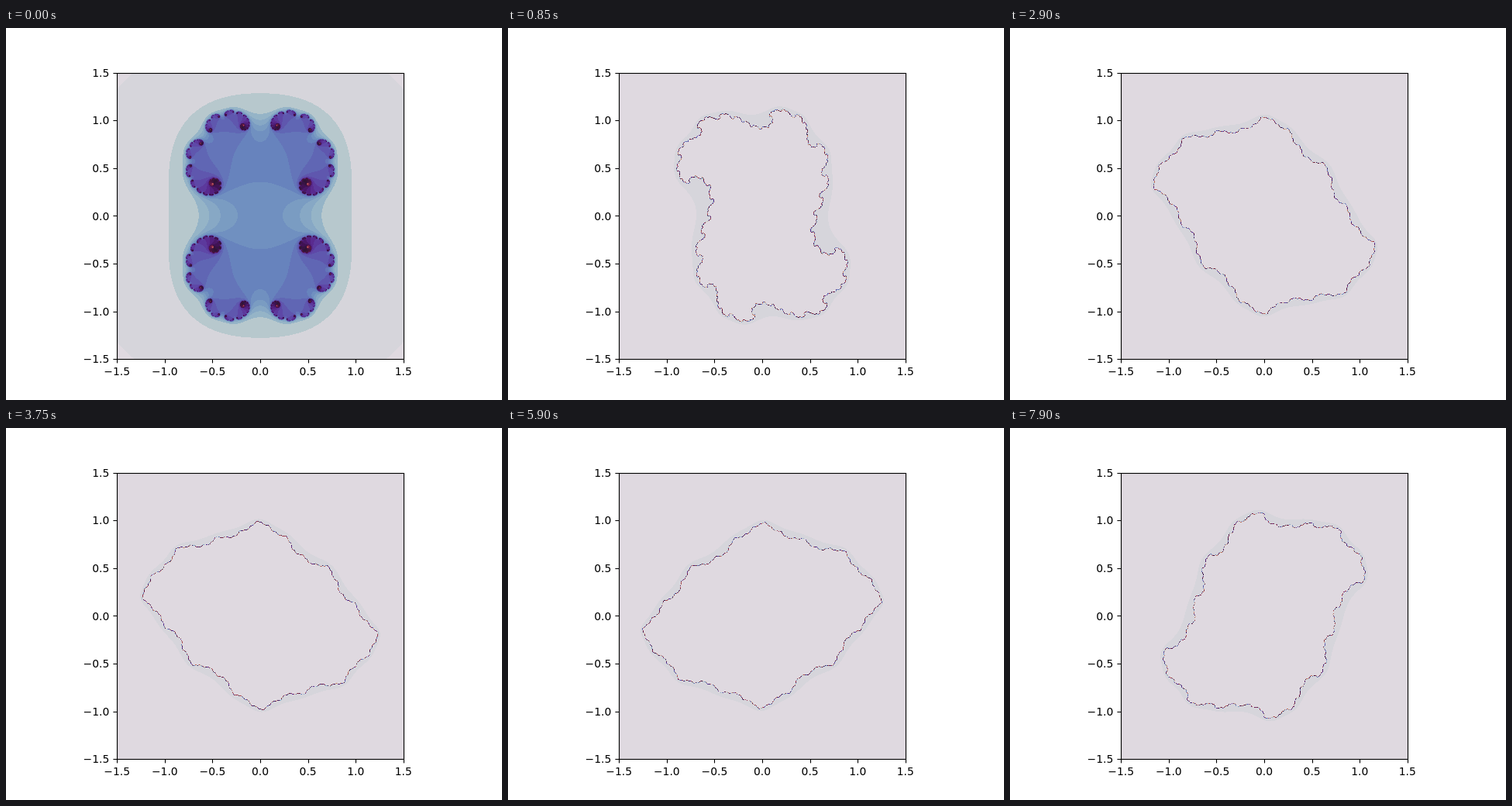
Recreate the animation shown at these times as an HTML page with a canvas. Size 640 by 480 pixels, loop 7950 ms.

```html
<!DOCTYPE html>
<html lang="en">
<head>
<meta charset="utf-8">
<title>Julia set</title>
<style>
  html, body { margin: 0; width: 100%; height: 100%; overflow: hidden; background: #fff; }
  canvas { display: block; }
</style>
</head>
<body>
<canvas id="stage" width="640" height="480"></canvas>
<script>
const STEP_MS = 50, STEPS = 159, LAST_ANGLE = 5, RADIUS = 0.36;
const MAX_ITER = 200, SIZE = 370, UNIT = 123.2, SUB = 3;
const LEFT = 143, TOP = 57;

const ctx = document.getElementById('stage').getContext('2d');
const plot = document.createElement('canvas');
plot.width = plot.height = SIZE;
const plotCtx = plot.getContext('2d');
const image = plotCtx.createImageData(SIZE, SIZE);
const pixels = new Uint32Array(image.data.buffer);
const counts = new Float32Array(SIZE * SIZE);
const smooth = new Float32Array(SIZE * SIZE);

// Cyclic colour map: pale, blue, near black, red, pale
const stops = ('e2d9e2 c8d0d6 9ebbc9 7da0c3 6785be 6065b4 5e43a5 572388 421257 2f1436 ' +
  '471340 6a1b4b 8e2c50 a84750 ba6657 c58a72 ceac94 d6c3bb e2d9e2')
  .split(' ').map(hex => [0, 2, 4].map(k => parseInt(hex.substr(k, 2), 16)));
const pack = ([r, g, b]) => ((255 << 24) | (b << 16) | (g << 8) | r) >>> 0;
const PALE = [223, 217, 224], GREY = [214, 213, 219], MIST = [183, 200, 205];

function colour(k) {
  // The palest shades fall into three flat tones
  if (k < 10.5 || k > 498) return PALE;
  if (k < 31) return GREY;
  if (k < 55) return MIST;
  const pos = k / 510 * (stops.length - 1), i = Math.min(Math.floor(pos), stops.length - 2);
  return stops[i].map((a, j) => Math.round(a + (stops[i + 1][j] - a) * (pos - i)));
}
const palette = Uint32Array.from({ length: 1021 }, (_, k) => pack(colour(k / 2)));

// Escape counter for z -> z*z + c; orbits caught by the fixed point stop early
function makeCounter(cx, cy, fx, fy, trap) {
  const trap2 = trap > 0 ? trap * trap : -1;
  return (x, y) => {
    for (let n = 0; n < MAX_ITER; n++) {
      const xx = x * x, yy = y * y;
      if (xx + yy > 4) return n;
      const dx = x - fx, dy = y - fy;
      if (dx * dx + dy * dy < trap2) return MAX_ITER;
      y = 2 * x * y + cy;
      x = xx - yy + cx;
    }
    return MAX_ITER;
  };
}

function refine(count, col, row) {
  let sum = 0;
  for (let j = 0; j < SUB; j++) {
    for (let i = 0; i < SUB; i++) {
      sum += count((col + (i + 0.5) / SUB - SIZE / 2) / UNIT,
                   (SIZE / 2 - row - (j + 0.5) / SUB) / UNIT);
    }
  }
  return sum / (SUB * SUB);
}

function drawJulia(angle) {
  const cx = RADIUS * Math.cos(angle), cy = RADIUS * Math.sin(angle);

  // Fixed point (1 - sqrt(1 - 4c)) / 2
  const a = 1 - 4 * cx, b = -4 * cy, m = Math.hypot(a, b);
  const sx = Math.sqrt(Math.max(0, (m + a) / 2));
  const sy = Math.sqrt(Math.max(0, (m - a) / 2)) * (b < 0 ? -1 : 1);
  const fx = (1 - sx) / 2, fy = -sy / 2;
  const count = makeCounter(cx, cy, fx, fy, 1 - 2 * Math.hypot(fx, fy));
  const top = count(fx, fy + 0.0005);

  // The set is unchanged by a half turn, so half the grid is enough
  const total = SIZE * SIZE, half = total / 2;
  for (let i = 0; i < half; i++) {
    const col = i % SIZE, row = (i - col) / SIZE;
    counts[i] = counts[total - 1 - i] =
      count((col + 0.5 - SIZE / 2) / UNIT, (SIZE / 2 - row - 0.5) / UNIT);
  }
  for (let i = 0; i < half; i++) {
    const col = i % SIZE, row = (i - col) / SIZE, n = counts[i];
    const differs = k => Math.abs(counts[k] - n) > 1;
    const edge = (col > 0 && differs(i - 1)) || (col < SIZE - 1 && differs(i + 1)) ||
      (row > 0 && differs(i - SIZE)) || differs(i + SIZE);
    smooth[i] = edge ? refine(count, col, row) : n;
  }
  for (let i = 0; i < half; i++) {
    const shade = palette[Math.round(Math.min(1, smooth[i] / top) * 1020)];
    pixels[i] = pixels[total - 1 - i] = shade;
  }
  plotCtx.putImageData(image, 0, 0);
  ctx.drawImage(plot, 0, 1, SIZE, SIZE - 1, LEFT, TOP + 1, SIZE, SIZE - 1);
}

const snap = v => Math.floor(v + 0.5) + 0.5;

function line(x1, y1, x2, y2) {
  ctx.beginPath();
  ctx.moveTo(x1, y1);
  ctx.lineTo(x2, y2);
  ctx.stroke();
}

function drawAxes() {
  ctx.strokeStyle = ctx.fillStyle = '#000';
  ctx.lineWidth = 1.11;
  ctx.strokeRect(143.5, 58.5, 370, 369);
  ctx.font = '13.89px "DejaVu Sans", sans-serif';
  for (let k = 0; k < 7; k++) {
    const value = (k - 3) / 2;
    const label = (value < 0 ? '\u2212' : '') + Math.abs(value).toFixed(1);
    const x = 143.2 + 61.6 * k, y = 427.2 - 61.6 * k;
    line(snap(x), 427.5, snap(x), 432.4);
    line(138.4, snap(y), 143.5, snap(y));
    ctx.textAlign = 'center';
    ctx.fillText(label, x, 448);
    ctx.textAlign = 'right';
    ctx.fillText(label, 133.3, Math.round(y + 5.2));
  }
}

let shown = -1;
const start = performance.now();

function render() {
  const step = Math.floor((performance.now() - start) / STEP_MS) % STEPS;
  if (step !== shown) {
    shown = step;
    ctx.fillStyle = '#fff';
    ctx.fillRect(0, 0, 640, 480);
    drawJulia(LAST_ANGLE * step / (STEPS - 1));
    drawAxes();
  }
  requestAnimationFrame(render);
}
render();
</script>
</body>
</html>
```
